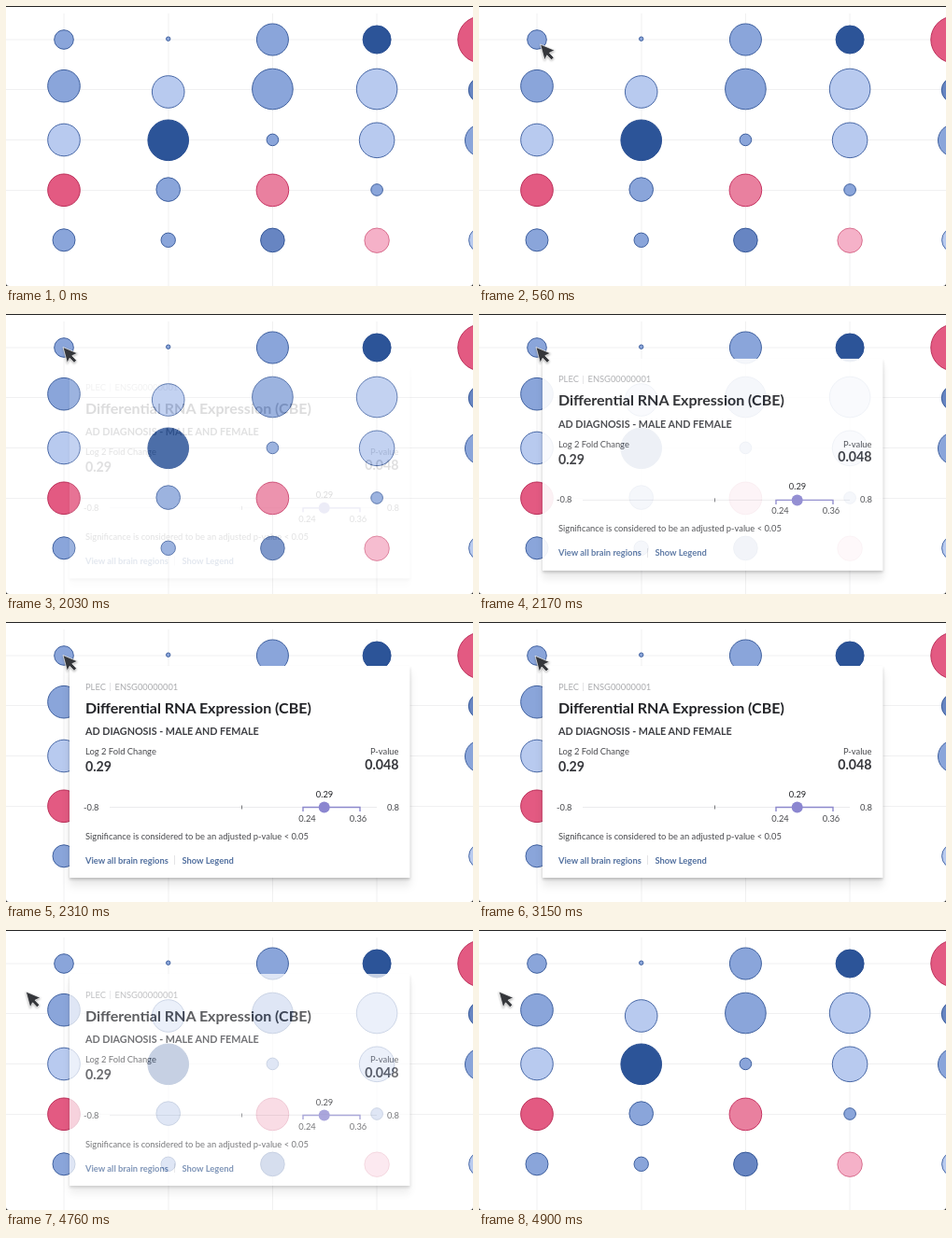
These frames come from a looping animation (500x300 px, 5950 ms). An HTML page:

```html
<!DOCTYPE html>
<html lang="en">
<head>
<meta charset="utf-8">
<title>Chart tooltip</title>
<style>
  html, body { margin: 0; width: 100%; height: 100%; overflow: hidden; background: #222; }
  svg { display: block; width: 100%; height: 100%; }
  text { font: 9.35px Lato, sans-serif; fill: #47484c; }
  .bold { font-weight: 700; }
  .title { font-size: 16px; fill: #222327; }
  .subtitle { font-size: 10.75px; fill: #3e3f44; }
  .value { font-size: 14.2px; fill: #36373c; }
  .muted { fill: #aaabae; }
  .link { fill: #52709f; }
  .end { text-anchor: end; }
  .mid { text-anchor: middle; }
  .panel { fill: #fff; filter: drop-shadow(0 2px 1.5px rgba(0,0,0,.2)) drop-shadow(0 8px 4px rgba(0,0,0,.09)); }
  .cursor { filter: drop-shadow(0 1px 1px rgba(0,0,0,.3)); }
</style>
</head>
<body>
<svg viewBox="0 0 500 300">
  <path d="M0 1H500V297Q500 300 497 300H3Q0 300 0 297Z" fill="#fff"/>
  <path d="M0 36H500M0 89.5H500M0 143.5H500M0 197.5H500M62 8V300M174 8V300M285.5 8V300M397 8V300"
        stroke="#f0f0f1" fill="none"/>
  <g id="bubbles"></g>

  <g id="card">
    <rect class="panel" x="68" y="47" width="364.5" height="227"/>
    <text class="muted" x="85" y="72.5">PLEC</text>
    <text class="muted" x="116.5" y="72.5">ENSG00000001</text>
    <path d="M111.5 65V74M180.5 250V260" stroke="#e4e4e6"/>
    <text class="bold title" x="85" y="97.5">Differential RNA Expression (CBE)</text>
    <text class="bold subtitle" x="85" y="121">AD DIAGNOSIS - MALE AND FEMALE</text>
    <text x="85" y="142">Log 2 Fold Change</text>
    <text class="bold value" x="85" y="160">0.29</text>
    <text class="end" x="420.5" y="142">P-value</text>
    <text class="bold value end" x="420.5" y="157.5">0.048</text>

    <path d="M111 198.5H397" stroke="#ebebed"/>
    <path d="M252.5 196.5V200.5" stroke="#77787c"/>
    <path d="M318 203V198.5H379V203" stroke="#8c88cc" stroke-width="1.4" fill="none"/>
    <circle cx="340.7" cy="198.5" r="6" fill="#8b86d0"/>
    <text x="83" y="201.5">-0.8</text>
    <text class="end" x="421" y="201.5">0.8</text>
    <text class="mid" x="341" y="187.5" style="fill:#222327">0.29</text>
    <text class="mid" x="322.5" y="213.5">0.24</text>
    <text class="mid" x="377" y="213.5">0.36</text>

    <text x="85" y="232.5">Significance is considered to be an adjusted p-value &lt; 0.05</text>
    <text class="bold link" x="85" y="258.5">View all brain regions</text>
    <text class="bold link" x="188.5" y="258.5">Show Legend</text>
  </g>

  <circle id="press" r="29" fill="#000"/>
  <path id="cursor" class="cursor" d="M0 0L15.5 6.5L9.8 9.2L14.5 14.2L12 16.8L7.2 11.8L4.6 17Z"
        fill="#35373b" stroke="#fff" stroke-width=".7"/>
</svg>

<script>
const LOOP = 5950, STEP = 70;
const $ = id => document.getElementById(id);

// [fill, stroke]
const palette = {
  pale: ['#b8caef', '#4767a6'], mid: ['#8aa5da', '#3f609f'], blue: ['#6785c2', '#365898'],
  navy: ['#2c5498', '#284e92'], red: ['#e35a82', '#bb2f59'], rose: ['#e9809f', '#c73462'],
  pink: ['#f5b1c8', '#d9708f']
};
// Each row: tone, radius and centre y, column by column.
const rows = [
  [['mid', 10.3, 36], ['mid', 2.2, 35.2], ['mid', 17, 36], ['navy', 15, 36], ['red', 25, 36]],
  [['mid', 17.3, 85.7], ['pale', 17.3, 92], ['mid', 21.8, 89], ['pale', 21.8, 89], ['blue', 13.5, 90]],
  [['pale', 17.3, 143.5], ['navy', 21.8, 143.8], ['mid', 6.3, 143.4], ['pale', 18.8, 143.8], ['mid', 17.3, 144]],
  [['red', 17.3, 197.3], ['mid', 12.8, 196.6], ['rose', 17.3, 197.4], ['mid', 6.3, 197]],
  [['mid', 12, 250.8], ['mid', 7.7, 250.8], ['blue', 12.8, 250.9], ['pink', 13.2, 251.2], ['pale', 13.2, 250.8]]
];
$('bubbles').innerHTML = rows.flat().map(([tone, r, y], i) => {
  const x = 62 + 111.7 * (i < 19 ? i % 5 : i - 19);
  const [fill, stroke] = palette[tone];
  return `<circle cx="${x}" cy="${y}" r="${r}" fill="${fill}" stroke="${stroke}"/>`;
}).join('');

// Pointer stops: time, x, y
const stops = [[70, 271, 253], [640, 54, 29], [700, 53, 28], [1120, 61, 35.5],
               [3100, 61, 35.5], [3640, 21.3, 66], [LOOP, 21.3, 66]];

const progress = (t, start, length) => Math.min(1, Math.max(0, (t - start) / length));
const smooth = p => p * p * (3 - 2 * p);
const easeIn = p => p ** 1.7;

function pointerAt(t) {
  const next = Math.max(1, stops.findIndex(s => s[0] > t));
  const [t0, x0, y0] = stops[next - 1], [t1, x1, y1] = stops[next];
  const p = smooth(progress(t, t0, t1 - t0));
  return [x0 + (x1 - x0) * p, y0 + (y1 - y0) * p];
}

function pressAlpha(t) {
  if (t >= 1540 && t < 1820 || t >= 4340 && t < 4620) return .15;
  return t >= 1470 && t < 1890 ? .07 : 0;
}

function draw(now) {
  const t = Math.floor(now % LOOP / STEP) * STEP;
  const [x, y] = pointerAt(t);
  const shown = easeIn(progress(t, 1956, 225));
  const hidden = easeIn(progress(t, 4670, 195));

  $('cursor').setAttribute('transform', `translate(${x} ${y})`);
  $('cursor').setAttribute('visibility', t < 70 ? 'hidden' : 'visible');
  $('press').setAttribute('transform', `translate(${x + .7} ${y + .5})`);
  $('press').setAttribute('opacity', pressAlpha(t));
  $('card').setAttribute('transform', `translate(0 ${11 * (1 - shown)})`);
  $('card').setAttribute('opacity', shown * (1 - hidden));
}

const began = performance.now();
function tick() {
  draw(performance.now() - began);
  requestAnimationFrame(tick);
}
tick();
</script>
</body>
</html>
```
